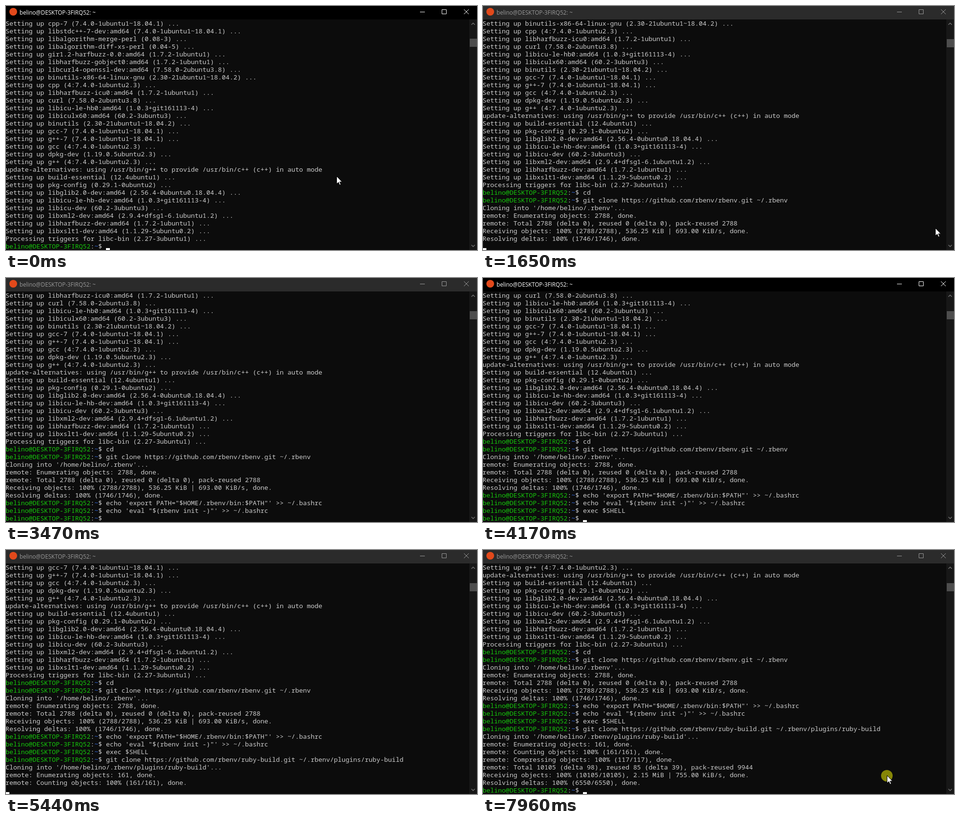
Animation, 975 px wide and 508 px high, one loop 8000 ms. Source, as an HTML page:

```html
<!DOCTYPE html>
<html lang="en">
<head>
<meta charset="utf-8">
<title>Terminal session</title>
<style>
html, body { margin: 0; width: 100%; height: 100%; overflow: hidden; background: #0c0c0c; }
#stage { position: relative; width: 975px; height: 508px; overflow: hidden; background: #0c0c0c; }
#stage > * { position: absolute; }
#bar { left: 0; top: 0; width: 975px; height: 28px; background: #000; color: #fff; }
#bar.inactive { background: #2b2b2b; color: #999; }
#bar > * { position: absolute; }
#icon { left: 7px; top: 4px; width: 16px; height: 16px; border-radius: 50%; background: #e2491b; }
#title { left: 28px; top: 0; font: 11.7px/26px "Open Sans", "Noto Sans", sans-serif; white-space: pre; }
#rows { left: -1px; top: 28px; font: 13.3333px/16px "Noto Sans Mono", "DejaVu Sans Mono", monospace; color: #ccc; }
#rows div { height: 16px; white-space: pre; }
#rows b { font-weight: 400; color: #16c60c; }
#rows i { font-style: normal; color: #3b78ff; }
#caret { top: 504px; width: 8px; height: 4px; background: #fff; }
#scroll { left: 959px; top: 28px; width: 16px; height: 480px; background: #171717; }
#thumb { left: 960px; width: 15px; height: 17px; background: #4d4d4d; }
#click { width: 24px; height: 24px; margin: -12px 0 0 -13px; border-radius: 50%; background: rgba(255, 255, 0, .5); }
#mouse { left: 0; top: 0; overflow: visible; }
</style>
</head>
<body>
<div id="stage">
  <div id="rows"></div>
  <div id="caret"></div>
  <div id="scroll"></div>
  <div id="thumb"></div>
  <svg width="975" height="508" fill="none" stroke="#777" stroke-width="1.3">
    <path d="M963.5 39l3.5-3.5 3.5 3.5M963.5 497.500l3.5 3.500 3.5-3.500"/>
  </svg>
  <div id="bar">
    <div id="icon"></div>
    <div id="title"></div>
    <svg width="975" height="28" fill="none" stroke="currentColor">
      <path d="M857 12.500h10M902.500 7.500h9v9h-9zM948 7l10 10M958 7l-10 10"/>
    </svg>
  </div>
  <div id="click"></div>
  <svg id="mouse" width="12" height="19">
    <path d="M.5.5v16l3.700-3.500 2.500 5.700 2.500-1-2.500-5.500h5z" fill="#fff" stroke="#000"/>
  </svg>
</div>
<script>
const LOOP = 8000, ROWS = 30, CELL = 8;
const USER = 'belino', HOST = 'DESKTOP-3FIRQ52';
const $ = id => document.getElementById(id);
const escape = s => s.replace(/&/g, '&amp;').replace(/</g, '&lt;');
const within = (spans, t) => spans.some(([from, to]) => t >= from && t < to);
const smooth = u => u * u * (3 - 2 * u);

// Interpolates rows of [time, ...values], clamped at both ends.
function track(keys, t, ease = u => u) {
  const next = keys.findIndex(k => k[0] > t);
  if (next < 0) return keys[keys.length - 1].slice(1);
  if (next === 0) return keys[0].slice(1);
  const a = keys[next - 1], b = keys[next];
  const u = ease((t - a[0]) / (b[0] - a[0]));
  return a.slice(1).map((v, i) => v + (b[i + 1] - v) * u);
}

function progress(label, total, keys) {
  return t => {
    const [count, size, speed] = track(keys, Math.floor(t / 45) * 45, u => u);
    const finished = t >= keys[keys.length - 1][0];
    const n = finished ? total : Math.round(count);
    let line = `${label}: ${String(Math.floor(n / total * 100)).padStart(3)}% (${n}/${total})`;
    if (size !== undefined) {
      const amount = size < 1024 ? size.toFixed(2) + ' KiB' : (size / 1024).toFixed(2) + ' MiB';
      line += `, ${amount} | ${Math.round(speed)}.00 KiB/s`;
    }
    return line + (finished ? ', done.' : '');
  };
}

// A row is filled at one time; the next row opens when it closes.
const log = [];
const print = (fill, text, close = fill) => log.push({ fill, close, html: t => escape(typeof text === 'string' ? text : text(t)) });
const prompt = (fill, close, command) => log.push({
  fill, close, col: 26,
  html: t => `<b>${USER}@${HOST}</b>:<i>~</i>$ ${t >= close ? escape(command) : ''}`
});

const setUp = list => list.trim().split('\n').forEach(s => print(0, `Setting up ${s.trim()} ...`));
setUp(`cpp-7 (7.4.0-1ubuntu1~18.04.1)
  libstdc++-7-dev:amd64 (7.4.0-1ubuntu1~18.04.1)
  libalgorithm-merge-perl (0.08-3)
  libalgorithm-diff-xs-perl (0.04-5)
  gir1.2-harfbuzz-0.0:amd64 (1.7.2-1ubuntu1)
  libharfbuzz-gobject0:amd64 (1.7.2-1ubuntu1)
  libcurl4-openssl-dev:amd64 (7.58.0-2ubuntu3.8)
  binutils-x86-64-linux-gnu (2.30-21ubuntu1~18.04.2)
  cpp (4:7.4.0-1ubuntu2.3)
  libharfbuzz-icu0:amd64 (1.7.2-1ubuntu1)
  curl (7.58.0-2ubuntu3.8)
  libicu-le-hb0:amd64 (1.0.3+git161113-4)
  libiculx60:amd64 (60.2-3ubuntu3)
  binutils (2.30-21ubuntu1~18.04.2)
  gcc-7 (7.4.0-1ubuntu1~18.04.1)
  g++-7 (7.4.0-1ubuntu1~18.04.1)
  gcc (4:7.4.0-1ubuntu2.3)
  dpkg-dev (1.19.0.5ubuntu2.3)
  g++ (4:7.4.0-1ubuntu2.3)`);
print(0, 'update-alternatives: using /usr/bin/g++ to provide /usr/bin/c++ (c++) in auto mode');
setUp(`build-essential (12.4ubuntu1)
  pkg-config (0.29.1-0ubuntu2)
  libglib2.0-dev:amd64 (2.56.4-0ubuntu0.18.04.4)
  libicu-le-hb-dev:amd64 (1.0.3+git161113-4)
  libicu-dev (60.2-3ubuntu3)
  libxml2-dev:amd64 (2.9.4+dfsg1-6.1ubuntu1.2)
  libharfbuzz-dev:amd64 (1.7.2-1ubuntu1)
  libxslt1-dev:amd64 (1.1.29-5ubuntu0.2)`);
print(0, 'Processing triggers for libc-bin (2.27-3ubuntu1) ...');

prompt(0, 180, 'cd');
prompt(180, 270, 'git clone https://github.com/rbenv/rbenv.git ~/.rbenv');
print(300, `Cloning into '/home/${USER}/.rbenv'...`);
print(650, 'remote: Enumerating objects: 2788, done.');
print(800, 'remote: Total 2788 (delta 0), reused 0 (delta 0), pack-reused 2788');
print(800, progress('Receiving objects', 2788, [[800, 0, 0, 500], [1250, 2788, 536.25, 693]]), 1250);
print(1250, progress('Resolving deltas', 1746, [[1250, 0], [1500, 1746]]), 1500);
prompt(1700, 1860, `echo 'export PATH="$HOME/.rbenv/bin:$PATH"' >> ~/.bashrc`);
prompt(1890, 2900, `echo 'eval "$(rbenv init -)"' >> ~/.bashrc`);
prompt(2920, 3800, 'exec $SHELL');
prompt(4050, 4780, 'git clone https://github.com/rbenv/ruby-build.git ~/.rbenv/plugins/ruby-build');
print(4800, `Cloning into '/home/${USER}/.rbenv/plugins/ruby-build'...`);
print(5300, 'remote: Enumerating objects: 161, done.');
print(5400, 'remote: Counting objects: 100% (161/161), done.');
print(5500, 'remote: Compressing objects: 100% (117/117), done.');
const receiving = progress('Receiving objects', 10105, [
  [5640, 0, 20, 300], [5900, 1080, 170, 330], [6480, 5356, 700.01, 359],
  [6740, 6800, 960, 420], [7100, 10105, 2201.6, 755]
]);
const total = 'remote: Total 10105 (delta 98), reused 85 (delta 39), pack-reused 9944';
print(5640, t => t < 6960 ? receiving(t) : total, 6960);
print(6960, receiving, 7100);
print(7100, progress('Resolving deltas', 6550, [[7100, 0], [7520, 6550]]), 7520);
prompt(7640, LOOP, '');

const mousePath = [
  [0, 685, 355], [250, 685, 355], [700, 760, 520],
  [1480, 940, 520], [1650, 937, 463], [1740, 935, 460], [1900, 935, 460], [2120, 920, 520],
  [2640, 918, 520], [2780, 917, 468], [2920, 917, 468], [3120, 900, 520],
  [3540, 880, 520], [3680, 870, 472], [3830, 870, 472], [4030, 860, 520],
  [4500, 850, 520], [4640, 840, 474], [4800, 838, 474], [4910, 836, 484], [5020, 836, 520],
  [7700, 836, 520], [7860, 837, 470]
];
const clicks = [[130, 250], [1760, 1880], [2770, 2900], [3690, 3820], [4660, 4790], [7900, LOOP]];
const unfocused = [[1280, 1760], [2420, 2770], [3330, 3690], [4300, 4660], [5300, LOOP]];
const caretSteady = [[800, 1500], [5640, 7640]];

$('title').textContent = `${USER}@${HOST}: ~`;
const rows = Array.from({ length: ROWS }, () => $('rows').appendChild(document.createElement('div')));
const shown = [];

function draw(t) {
  const open = log.filter((row, i) => i === 0 || log[i - 1].close <= t).length;
  const top = open - ROWS;
  rows.forEach((el, i) => {
    const row = log[top + i];
    const html = t >= row.fill ? row.html(t) : '';
    if (shown[i] !== html) el.innerHTML = shown[i] = html;
  });

  const last = log[open - 1];
  const blinkOff = within([[170, 435]], t % 530) && !within(caretSteady, t);
  $('caret').style.left = (t >= last.fill && last.col || 0) * CELL - 1 + 'px';
  $('caret').style.visibility = blinkOff ? 'hidden' : 'visible';
  $('thumb').style.top = (top > 0 ? 69 : 68) + 'px';
  $('bar').className = within(unfocused, t) ? 'inactive' : '';

  const [x, y] = track(mousePath, t, smooth);
  $('mouse').style.transform = `translate(${Math.round(x) - 1}px, ${Math.round(y) - 1}px)`;
  $('click').style.left = Math.round(x) + 'px';
  $('click').style.top = Math.round(y) + 'px';
  $('click').style.visibility = within(clicks, t) ? 'visible' : 'hidden';
}

const start = performance.now();
function tick() {
  draw((performance.now() - start) % LOOP);
  requestAnimationFrame(tick);
}
draw(0);
requestAnimationFrame(tick);
</script>
</body>
</html>
```
